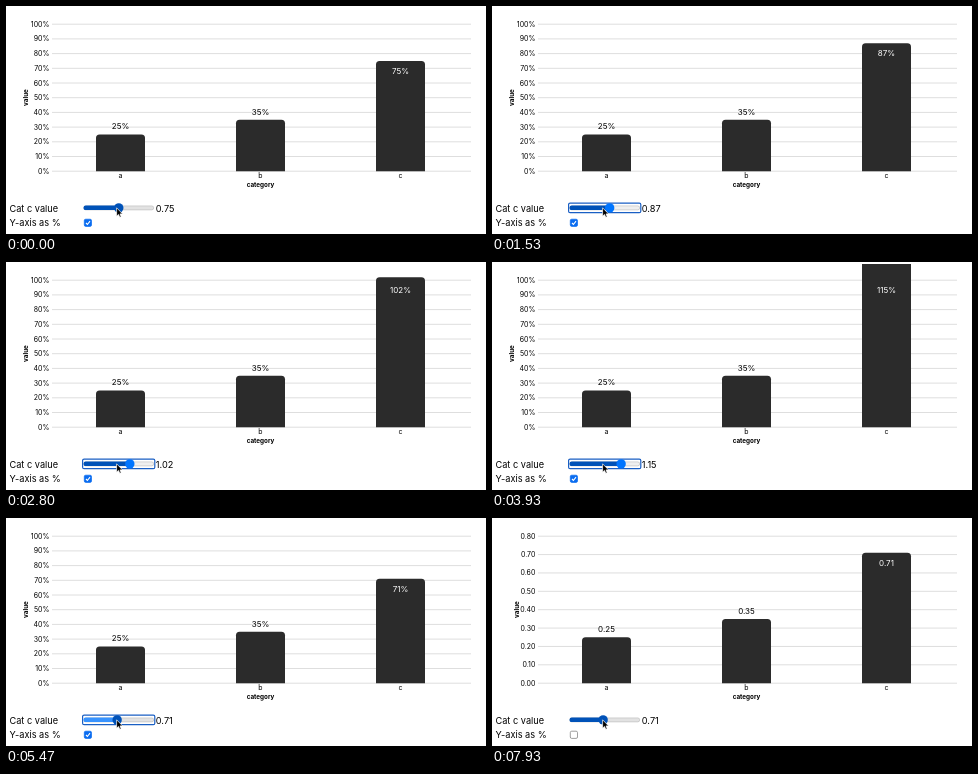
Animation of 480x228 px, one loop 8000 ms. Source, as an HTML page:

```html
<!DOCTYPE html>
<html lang="en">
<head>
<meta charset="utf-8">
<title>Bar chart with slider</title>
<style>
  html, body { margin: 0; width: 100%; height: 100%; overflow: hidden; background: #fff; }
  svg { display: block; width: 100vw; height: 100vh; font-family: Inter, "Liberation Sans", sans-serif; }
  .form { font-size: 9.2px; }
  .tick { font-size: 7px; }
  .end { text-anchor: end; }
  .mid { text-anchor: middle; }
  .title { font-size: 6.3px; font-weight: 700; text-anchor: middle; }
  .label { font-size: 8px; text-anchor: middle; }
  .grid { stroke: #dedede; }
</style>
</head>
<body>
<svg viewBox="0 0 480 228">
  <clipPath id="frame"><rect y="2" width="480" height="186"/></clipPath>
  <g id="axis"></g>
  <g id="bars" clip-path="url(#frame)" fill="#2b2b2b"></g>
  <text class="title" x="254.5" y="181">category</text>
  <text class="title" id="yTitle">value</text>

  <g class="form">
    <text x="3.5" y="206.2">Cat c value</text>
    <text x="3.5" y="220.4">Y-axis as %</text>
    <text id="readout" x="149.8" y="206.2"></text>
  </g>

  <rect id="ring" x="76.6" y="197.1" width="72.2" height="9.6" rx="1.5" fill="#fff" stroke="#1a5fc4" stroke-width="1.2"/>
  <rect id="track" x="77.8" y="199.9" width="69.9" height="4" rx="2" stroke="#b2b2b2" stroke-width=".55"/>
  <rect id="fill" x="77.5" y="199.6" height="4.5" rx="2.2"/>
  <circle id="thumb" cy="201.9" r="4.7"/>

  <rect id="box" x="78.3" y="213.2" width="7.2" height="7.2" rx="1.4" stroke-width=".7"/>
  <path id="check" d="M80 217l1.4 1.5 2.6-3.4" fill="none" stroke="#fff" stroke-width="1.1"/>

  <path id="cursor" d="M0 0V8.4L1.9 6.6 3.2 9.5 4.6 8.9 3.4 6.1H6Z" stroke="#fff" stroke-width=".7" stroke-linejoin="round"/>
</svg>

<script>
const LOOP = 8000, TICK = 200 / 3;
const BASE = 165.2, HEIGHT = 147;
const BLUE = { rest: '#0075ff', hover: '#0052b8', press: '#3793ff' };
const SLIDER = [110.6, 201.8], CHECKBOX = [82, 218.8], NUDGED = [81.2, 217.3];

const el = Object.fromEntries([...document.querySelectorAll('[id]')].map(e => [e.id, e]));
const set = (node, attrs) => { for (const k in attrs) node.setAttribute(k, attrs[k]); };
const show = (node, on) => { node.style.display = on ? '' : 'none'; };
const number = (v, percent) => percent ? Math.round(v * 100) + '%' : v.toFixed(2);

// The arrow key is held down: one step per key repeat, seen at the screen's tick.
function valueAt(t) {
  if (t < 270) return 0.75;
  if (t >= 5465) return 0.71;
  const tick = Math.floor(t / TICK + 0.1);
  const repeats = Math.floor((tick - 10.38) / 1.255);
  return 0.77 + 0.01 * Math.max(-1, Math.min(51, repeats));
}

function glide(t, start, end, from, to) {
  const p = Math.max(0, Math.min(1, (t - start) / (end - start)));
  const e = p * p * (3 - 2 * p);
  return from.map((v, i) => v + (to[i] - v) * e);
}

function cursorAt(t) {
  if (t < 6950) return glide(t, 6340, 6800, SLIDER, CHECKBOX);
  if (t < 7600) return glide(t, 6950, 7130, CHECKBOX, NUDGED);
  return glide(t, 7610, 7930, NUDGED, SLIDER);
}

function drawAxis(percent) {
  const steps = percent ? 10 : 8;
  let out = '';
  for (let i = 0; i <= steps; i++) {
    const y = BASE - HEIGHT * i / steps;
    out += `<path class="grid" d="M46 ${y}H465"/>
      <text class="tick end" x="43.4" y="${y + 2.5}">${number(i / 10, percent)}</text>`;
  }
  ['a', 'b', 'c'].forEach((name, i) => {
    out += `<text class="tick mid" x="${114.4 + 140 * i}" y="172.2">${name}</text>`;
  });
  el.axis.innerHTML = out;
  set(el.yTitle, { transform: `translate(${percent ? 21.5 : 26.5} 91.5) rotate(-90)` });
}

function drawBars(value, percent) {
  const top = BASE - HEIGHT;
  el.bars.innerHTML = [0.25, 0.35, value].map((v, i) => {
    const x = 90 + 140 * i, y = BASE - HEIGHT * v / (percent ? 1 : 0.8);
    const inside = i === 2;
    const textY = inside ? Math.max(y, top) + 13 : y - 5.2;
    return `<path d="M${x} ${BASE}V${y + 3.6}q0-3.6 3.6-3.6h41.8q3.6 0 3.6 3.6V${BASE}z"/>
      <text class="label" x="${x + 24.5}" y="${textY}" fill="${inside ? '#fff' : '#000'}">${number(v, percent)}</text>`;
  }).join('');
}

function drawSlider(t, value, cursor) {
  const x = 82.1 + 40.9 * value;
  const hover = cursor[1] < 206.5;
  const pressed = t >= 5465 && t < 5595;
  const byKey = t >= 270 && t < 5465;
  const state = hover ? BLUE.hover : BLUE.rest;
  show(el.ring, t >= 270 && t < 7325);
  set(el.track, { fill: hover && !byKey ? '#e2e2e2' : '#efefef' });
  set(el.fill, { width: x - 77.5, fill: pressed ? BLUE.press : state });
  set(el.thumb, { cx: x, fill: byKey ? BLUE.rest : state });
  el.readout.textContent = value.toFixed(2);
}

function drawCheckbox(checked, cursor) {
  const hover = cursor[0] < 86 && cursor[1] > 213;
  const blue = hover ? '#005cc8' : '#0a6cf0';
  set(el.box, { fill: checked ? blue : '#fff', stroke: checked ? blue : '#767676' });
  show(el.check, checked);
}

let drawn = '';
function render(t) {
  const value = valueAt(t), percent = t < 7325;
  const cursor = cursorAt(Math.floor(t / TICK + 0.1) * TICK);
  const key = value + '|' + percent;
  if (key !== drawn) {
    drawAxis(percent);
    drawBars(value, percent);
    drawn = key;
  }
  drawSlider(t, value, cursor);
  drawCheckbox(percent, cursor);
  set(el.cursor, { transform: `translate(${cursor})` });
}

const start = performance.now();
function loop() {
  render((performance.now() - start) % LOOP);
  requestAnimationFrame(loop);
}
loop();
</script>
</body>
</html>
```
